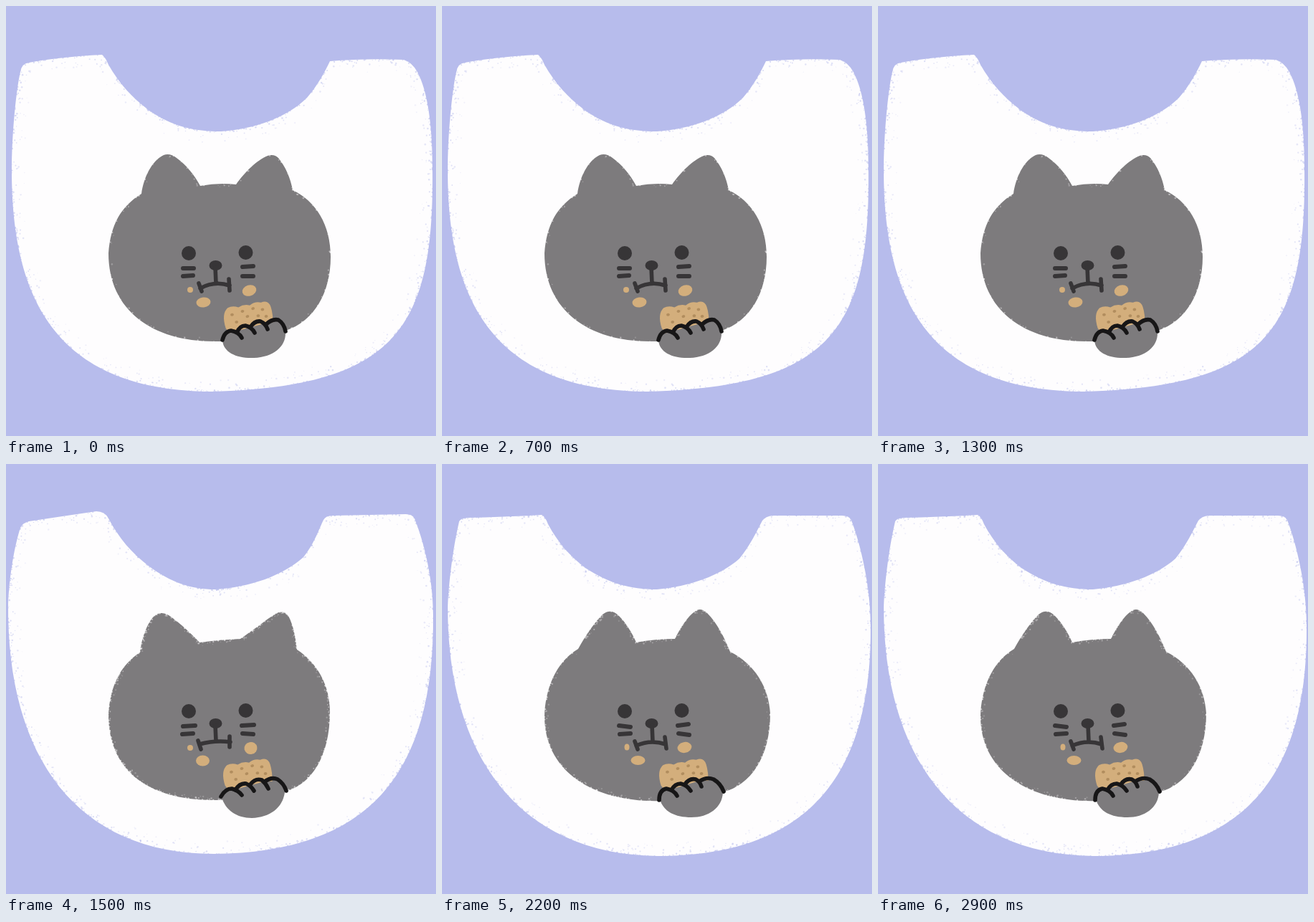
These frames come from a looping animation (600 by 600 pixels, 3000 ms). An HTML page with a canvas:

```html
<!DOCTYPE html>
<html lang="en">
<head>
<meta charset="utf-8">
<title>Cat bib</title>
<style>
html, body { margin: 0; width: 100%; height: 100%; overflow: hidden; background: #b7bcec; }
canvas { display: block; width: 600px; height: 600px; }
</style>
</head>
<body>
<canvas id="stage" width="600" height="600"></canvas>
<script>
const STEP = 100;
const ORDER = "ABABCABABCBBCABCACABCCBCBAACCB";
const BG = "#b7bcec", CLOTH = "#fefdfe", FUR = "#7d7b7d";
const INK = "#373537", CLAW = "#171617", BISCUIT = "#d3ae7c", SPOT = "#b18d5e";
const BISCUIT_SHAPE = "M-33 12Q-37 -9 -27 -16Q-20 -19 -12 -15Q-4 -19 4 -16Q12 -21 20 -18Q31 -21 33 -10Q35 0 33 18L-28 20Z";

// crumbs: x, y, rx, ry, angle
const POSES = {
  A: {
    seed: 11, fuzz: 0.25,
    bib: "M20 92Q22 80 32 79Q75 71 134 68Q139 72 143 82C158 108 175 127 200 146C232 168 262 175 300 175C345 172 392 156 420 128C434 112 445 92 452 77Q500 73 555 75Q567 79 574 92C588 118 595 165 595 225C598 450 545 530 290 538C75 538 8 415 8 230C8 180 14 118 20 92Z",
    cat: "M189 262C192 240 203 216 220 208Q229 205 238 212C252 222 263 236 271 251Q297 246 321 249C333 232 350 215 365 209Q374 206 380 212C390 224 397 240 400 257C432 272 453 305 453 350C453 400 430 440 390 453C370 463 335 469 290 468C205 468 143 425 143 345C146 305 160 280 189 262Z",
    whiskers: "M247 366H262M247 377L261 376M330 364L345 363M330 377H345",
    mouth: "M292 364L293 387M269 387L273 398M271 394Q291 383 312 390M311 381L312 397",
    crumbs: [[257, 396, 4, 4, 0], [275.5, 413.5, 10, 7, -0.1], [339.5, 397, 10, 7.5, -0.3]],
    biscuit: [338, 434],
    paw: "M302 466C303 484 323 492 346 491C372 490 391 476 390 455L380 440L357 444L335 450L313 456Z",
    scallops: "M302 466Q305 454 314 453Q325 455 329 463M322 456Q326 446 334 446Q343 448 347 456M341 448Q347 439 355 440Q362 443 365 451M362 445Q371 436 380 438Q388 443 390 454"
  },
  B: {
    seed: 29, fuzz: 0.6,
    bib: "M24 80Q26 76 34 75Q85 74 139 71Q144 73 148 84C162 110 178 128 200 145C232 166 262 175 300 175C345 171 388 156 415 132C430 114 440 92 447 79Q451 73 462 72L558 72Q568 72 571 78C584 112 598 170 598 225C600 425 520 547 300 547C105 544 8 405 8 200C10 155 17 110 24 80Z",
    cat: "M190 258C200 240 212 222 224 210Q235 201 246 211C257 222 265 235 271 249Q298 244 325 244C333 228 343 212 354 205Q361 200 370 208C384 222 394 242 402 262C436 279 456 311 458 348C458 410 430 448 392 458C366 468 328 471 290 470C205 468 143 425 143 352C144 315 158 277 190 258Z",
    whiskers: "M247 365L263 367M248 377L263 376M329 365L344 363M330 376L345 378",
    mouth: "M293 364L294 387M269 387L273 398M271 393Q291 384 312 391M311 381L313 397",
    crumbs: [[258, 395, 3.5, 4.5, 0], [273.5, 413.5, 10, 6.5, 0], [338.5, 395.5, 10, 7.5, -0.2]],
    biscuit: [337, 433],
    paw: "M304 468C309 485 325 493 348 493C372 493 391 480 392 458L380 441L356 443L333 450L312 456Z",
    scallops: "M303 469Q303 455 313 453Q324 455 328 463M320 455Q325 446 333 446Q342 448 347 456M339 447Q345 438 354 440Q360 443 362 450M359 443Q369 436 379 440Q389 446 393 457"
  },
  C: {
    seed: 47, fuzz: 1,
    bib: "M19 92Q22 82 32 80Q78 73 126 66Q138 66 143 76C158 104 175 124 200 143C230 165 258 175 292 175C340 172 386 156 415 130C430 112 438 88 443 78Q446 72 456 72L558 70Q567 70 570 76C583 108 596 160 596 210C598 435 505 542 290 544C100 544 1 410 3 195C5 152 12 116 19 92Z",
    cat: "M187 263C189 244 197 222 206 213Q215 204 227 211C243 222 258 236 270 249Q298 245 327 244C342 234 362 218 376 209Q388 203 394 212C401 225 404 242 406 259C434 277 452 309 452 345C452 410 425 447 390 457C366 464 328 469 290 469C195 469 143 425 143 350C145 310 160 280 187 263Z",
    whiskers: "M247 366L264 365M246 377L261 376M329 365L346 364M330 376L345 377",
    mouth: "M292 364L293 387M268 386L272 398M270 391Q292 385 313 388M312 380L312 395",
    crumbs: [[257, 396, 4, 4, 0], [274.5, 414, 9.5, 7.5, 0], [341.5, 396.5, 9, 8.5, -0.2]],
    biscuit: [337, 433],
    paw: "M301 465C306 483 322 494 343 494C368 493 386 480 389 458L380 442L357 444L335 450L314 456Z",
    scallops: "M300 464Q306 453 315 453Q325 456 329 462M320 455Q326 445 335 446Q342 449 346 456M341 447Q348 438 357 441Q363 446 366 453M360 444Q370 436 379 440Q388 446 391 456"
  }
};

function seeded(s) {
  return () => (s = (s * 16807) % 2147483647) / 2147483647;
}

function ellipse(c, color, x, y, rx, ry = rx, angle = 0) {
  c.fillStyle = color;
  c.beginPath();
  c.ellipse(x, y, rx, ry, angle, 0, Math.PI * 2);
  c.fill();
}

function shape(c, color, d) {
  c.fillStyle = color;
  c.fill(new Path2D(d));
}

function line(c, color, width, d) {
  c.strokeStyle = color;
  c.lineWidth = width;
  c.stroke(new Path2D(d));
}

// Crayon grain: specks that thin out from the rim inwards.
function grain(c, d, color, rnd, count, depth, alpha) {
  const path = document.createElementNS("http://www.w3.org/2000/svg", "path");
  path.setAttribute("d", d);
  const length = path.getTotalLength();
  for (let i = 0; i < count; i++) {
    const at = rnd() * (length - 2);
    const p = path.getPointAtLength(at), q = path.getPointAtLength(at + 1);
    const turn = Math.atan2(q.y - p.y, q.x - p.x) + Math.PI / 2;
    const inset = depth * rnd() ** 3;
    c.globalAlpha = alpha * (1 - 0.7 * inset / depth);
    ellipse(c, color, p.x + Math.cos(turn) * inset, p.y + Math.sin(turn) * inset, 0.5 + rnd() * 0.8);
  }
  c.globalAlpha = 1;
}

function drawBiscuit(c, [x, y]) {
  c.save();
  c.translate(x, y);
  c.rotate(-0.12);
  shape(c, BISCUIT, BISCUIT_SHAPE);
  for (const [u, v] of [[-22, -6], [-7, -9], [8, -11], [21, -8], [-17, 5], [-1, -1], [14, 0], [25, 2]])
    ellipse(c, SPOT, u, v, 2.4, 2);
  c.restore();
}

function layer() {
  const canvas = document.createElement("canvas");
  canvas.width = canvas.height = 600;
  return canvas.getContext("2d");
}

function paint(pose) {
  const c = layer();
  const rnd = seeded(pose.seed);
  c.lineCap = c.lineJoin = "round";

  shape(c, CLOTH, pose.bib);
  grain(c, pose.bib, BG, rnd, 700, 18, 0.55);
  shape(c, FUR, pose.cat);
  grain(c, pose.cat, CLOTH, rnd, 420 * pose.fuzz, 5, 0.55);

  ellipse(c, INK, 255, 345, 10);
  ellipse(c, INK, 334.5, 344, 10);
  ellipse(c, INK, 292.5, 362, 9, 7);
  line(c, INK, 6, pose.whiskers);
  line(c, INK, 5.6, pose.mouth);
  for (const crumb of pose.crumbs) ellipse(c, BISCUIT, ...crumb);

  drawBiscuit(c, pose.biscuit);
  shape(c, FUR, pose.paw);
  line(c, CLAW, 5.6, pose.scallops);

  // Soft pencil edges over the flat backdrop
  const sheet = layer();
  sheet.fillStyle = BG;
  sheet.fillRect(0, 0, 600, 600);
  sheet.filter = "blur(0.7px)";
  sheet.drawImage(c.canvas, 0, 0);
  return sheet.canvas;
}

const sheets = {};
for (const key in POSES) sheets[key] = paint(POSES[key]);

const stage = document.getElementById("stage").getContext("2d");
const start = performance.now();
function show() {
  const step = Math.floor(Math.max(0, performance.now() - start) / STEP) % ORDER.length;
  stage.drawImage(sheets[ORDER[step]], 0, 0);
  requestAnimationFrame(show);
}
show();
</script>
</body>
</html>
```
